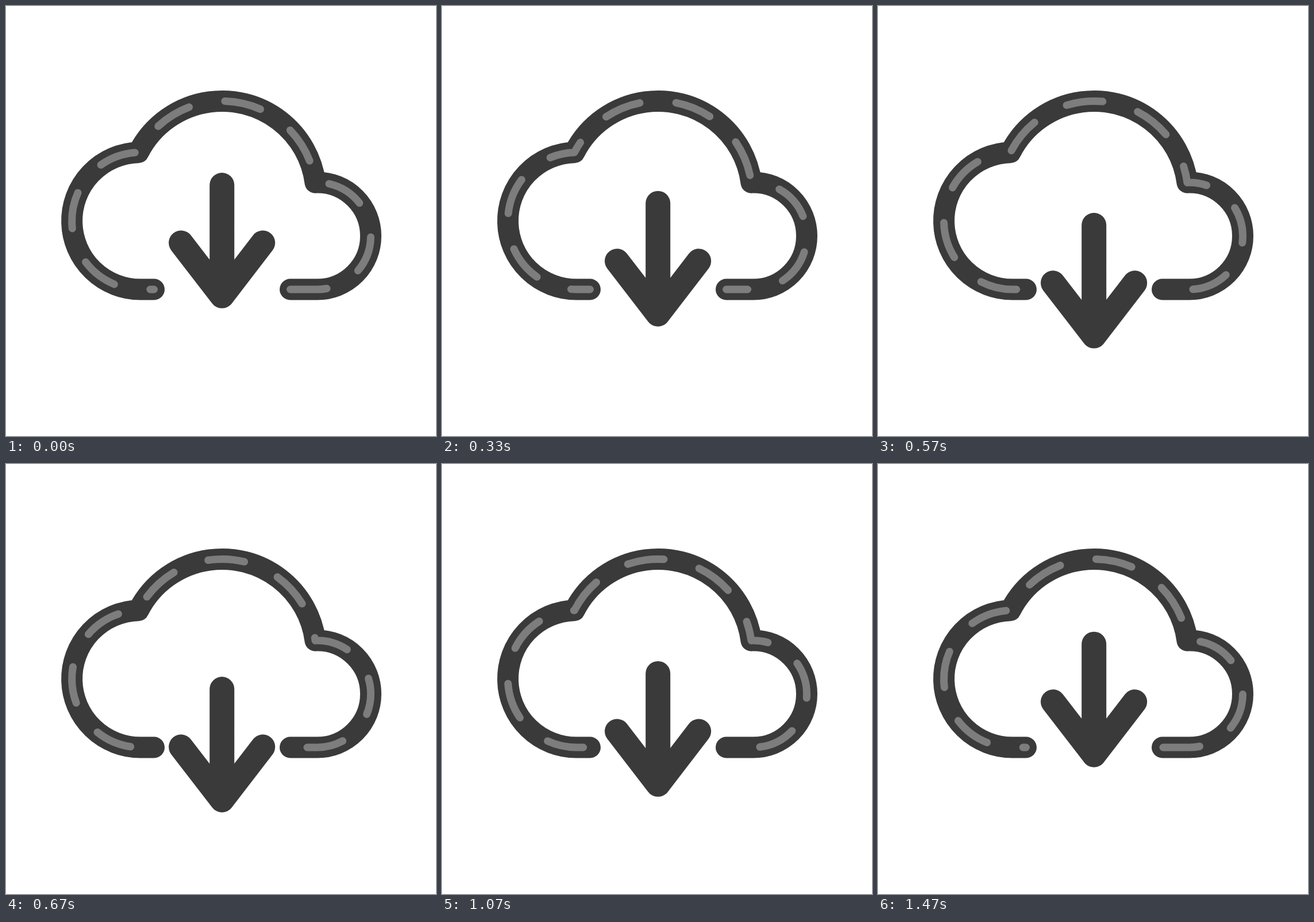
Animation, 748 px wide and 748 px high, one loop 1.51 s. Source, as an HTML page with a canvas:

```html
<!DOCTYPE html>
<html lang="en">
<head>
<meta charset="utf-8">
<title>Cloud download</title>
<style>
  html, body { margin: 0; width: 100%; height: 100%; overflow: hidden; background: #fff; }
  canvas { display: block; width: 748px; height: 748px; }
</style>
</head>
<body>
<canvas id="stage" width="748" height="748"></canvas>
<script>
const ctx = document.getElementById('stage').getContext('2d');
const LOOP = 1510, STEPS = 45, PEAK = 21.4;
const DROP = 83, DASH = 63.6;
const DARK = '#3a3a3a', LIGHT = '#7d7d7d';
const rad = degrees => degrees * Math.PI / 180;
const ease = u => u * u * (3 - 2 * u);

const cloud = new Path2D();
cloud.moveTo(494.5, 493);
cloud.arc(541.5, 400, 93, rad(90), rad(-92.2), true);
cloud.arc(376, 328.8, 163.4, rad(-7.6), rad(-153), true);
cloud.arc(233.8, 373.8, 119.2, rad(-91.6), rad(-270), true);
cloud.lineTo(257.5, 493);

const arrow = new Path2D('M375.7 311.5V504.3M304.5 412L375.7 504.3L446.7 412');

function stroke(path, color, width, dash = [], offset = 0) {
  ctx.strokeStyle = color;
  ctx.lineWidth = width;
  ctx.setLineDash(dash);
  ctx.lineDashOffset = offset;
  ctx.stroke(path);
}

// The motion runs at 30 steps per second and rests on the first pose for one extra step.
function stepAt(time) {
  const step = Math.floor((time % LOOP + 3.4) * 0.03) - 1;
  return Math.min(Math.max(step, 0), STEPS - 2);
}

function draw(time) {
  const step = stepAt(time);
  const lift = step < PEAK ? step / PEAK : (STEPS - step) / (STEPS - PEAK);

  ctx.fillStyle = '#fff';
  ctx.fillRect(0, 0, 748, 748);
  ctx.lineCap = ctx.lineJoin = 'round';

  stroke(cloud, DARK, 37);
  stroke(cloud, LIGHT, 13, [DASH, DASH], 4 * DASH * ease(step / STEPS));

  ctx.save();
  ctx.translate(0, DROP * ease(lift));
  stroke(arrow, DARK, 43);
  ctx.restore();
}

let start;
function tick(now) {
  start ??= now;
  draw(now - start);
  requestAnimationFrame(tick);
}
draw(0);
requestAnimationFrame(tick);
</script>
</body>
</html>
```
